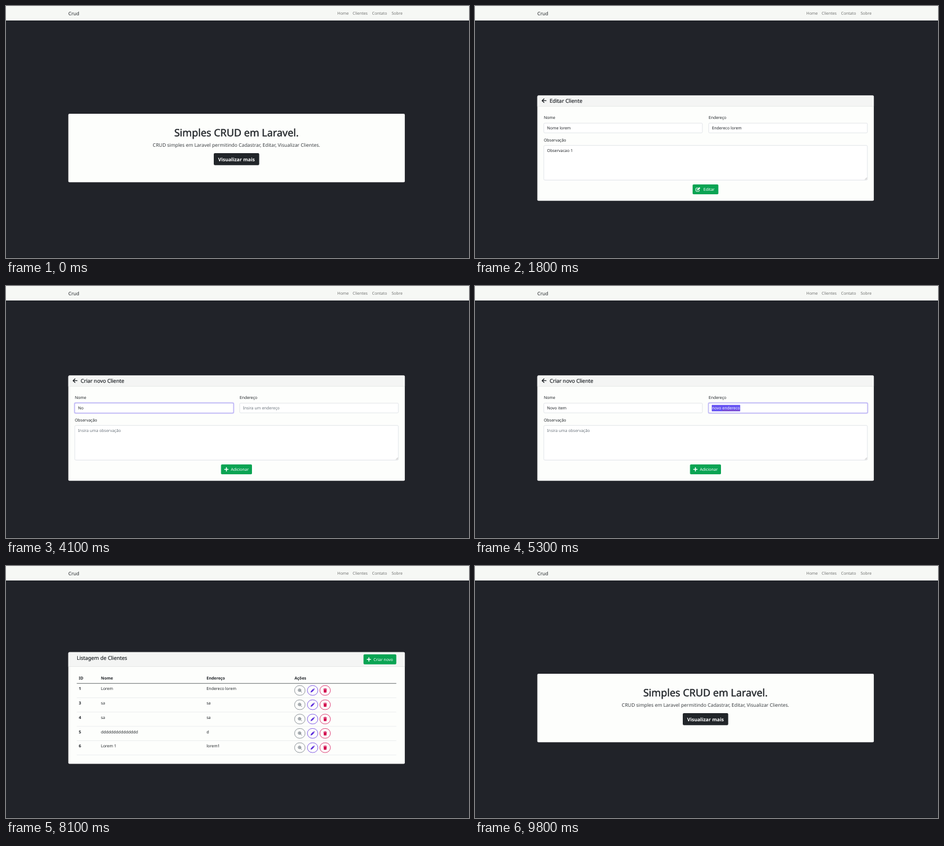
Recreate the animation shown at these times as an HTML page. Size 800 by 435 pixels, loop 9900 ms.

```html
<!DOCTYPE html>
<html lang="pt">
<head>
<meta charset="utf-8">
<title>Crud</title>
<style>
  html, body { margin: 0; width: 100%; height: 100%; overflow: hidden; background: #212329; }
  svg { display: block; width: 800px; height: 435px; }
  text { font-family: "Noto Sans", "Open Sans", sans-serif; text-rendering: geometricPrecision; white-space: pre; }
</style>
</head>
<body>
<svg id="stage" viewBox="0 0 800 435"></svg>
<script>
const LOOP = 9900;
const INK = '#212529', GREEN = '#0aa453', GREEN_HOVER = '#0b8c47';
const GRAY = '#6c757d', INDIGO = '#5a2bdc', RED = '#d2044c', SELECT = '#6552f2';
const SIZE = 6.95;
const stage = document.getElementById('stage');

// Width of a run of text, used for selection boxes.
const pen = document.createElement('canvas').getContext('2d');
function widthOf(str) {
  pen.font = '100px "Noto Sans", "Open Sans", sans-serif';
  return pen.measureText(str).width * SIZE / 100;
}

const rect = (x, y, w, h, fill, r = 0, more = '') =>
  `<rect x="${x}" y="${y}" width="${w}" height="${h}" rx="${r}" fill="${fill}" ${more}/>`;
const line = (x1, x2, y, color, w = .6) =>
  `<path d="M${x1} ${y}H${x2}" stroke="${color}" stroke-width="${w}"/>`;

// Text is placed by the middle of its capitals.
function text(str, x, mid, { size = SIZE, fill = INK, bold, medium, anchor = 'start' } = {}) {
  const extra = (bold ? ' font-weight="700"' : '') +
    (medium ? ` stroke="${fill}" stroke-width="${size * .022}"` : '');
  return `<text x="${x}" y="${mid + size * .357}" font-size="${size}" fill="${fill}" text-anchor="${anchor}"${extra}>${str}</text>`;
}

function selected(str, x, mid) {
  return rect(x - .3, mid - 5.5, widthOf(str) + .6, 11, SELECT) + text(str, x, mid, { fill: '#fff' });
}

// Icons are drawn around the origin.
const icons = {
  plus: c => `<path d="M-3 0H3M0-3V3" stroke="${c}" stroke-width="1.5" stroke-linecap="round"/>`,
  arrow: c => `<path d="M3.6 0H-3M0-3.2L-3.3 0L0 3.2" fill="none" stroke="${c}" stroke-width="1.4" stroke-linecap="round" stroke-linejoin="round"/>`,
  zoom: c => `<g fill="none" stroke="${c}" stroke-width=".9" stroke-linecap="round"><circle cx="-.5" cy="-.5" r="2.4"/><path d="M1.4 1.4L3.2 3.2M-1.7-.5H.7M-.5-1.7V.7"/></g>`,
  pencil: c => `<path d="M-3.5 3.5L-3 1.2L1-2.8L2.8-1L-1.2 3ZM1.6-3.2L2.2-3.6Q2.7-3.8 3.3-3.1T3.6-2.1L3.1-1.5Z" fill="${c}"/>`,
  trash: c => `<path d="M-3-3H-1.2L-.8-3.6H.8L1.2-3H3V-2.1H-3ZM-2.6-1.6H2.6L2.3 3.1Q2.2 3.6 1.7 3.6H-1.7Q-2.2 3.6-2.3 3.1Z" fill="${c}"/>`,
  edit: c => `<path d="M.4-2.3H-2.9Q-3.6-2.3-3.6-1.6V2.7Q-3.6 3.4-2.9 3.4H1.5Q2.2 3.4 2.2 2.7V.8" fill="none" stroke="${c}" stroke-width="1"/><path d="M-1.5 1.5L-1.2-.2L2.4-3.7L4-2.1L.3 1.3Z" fill="${c}"/>`
};
const icon = (name, x, y, color = '#fff') => `<g transform="translate(${x} ${y})">${icons[name](color)}</g>`;

function button(label, name, x, y, w, fill, textX) {
  return rect(x, y, w, 17.2, fill, 1.8) + icon(name, x + 9.3, y + 8.6) +
    text(label, textX, y + 8.6, { fill: '#fff' });
}

function card(top, height, head = 0) {
  let s = rect(107.7, top, 581.4, height, '#fdfefc', 2);
  if (head) {
    s += `<path d="M107.7 ${top + head}V${top + 2}q0-2 2-2H687.1q2 0 2 2V${top + head}Z" fill="#f4f5f4"/>`;
    s += line(107.7, 689.1, top + head, '#dcdedd');
  }
  return s;
}

function frame() {
  const nav = [['Home', 572.5], ['Clientes', 599], ['Contato', 632.5], ['Sobre', 666.3]];
  return rect(0, 0, 800, 435, '#212329') + rect(0, 434, 800, 1, '#1a1b20') +
    rect(0, 0, 800, 25, '#f6f8f5') + text('Crud', 107.7, 12.8, { size: 8.3 }) +
    nav.map(([label, x]) => text(label, x, 12.8, { fill: '#717372' })).join('');
}

function home() {
  const mid = 398.2;
  return card(186, 118.3) +
    text('Simples CRUD em Laravel.', mid, 218.6, { size: 17.5, medium: true, anchor: 'middle' }) +
    text('CRUD simples em Laravel permitindo Cadastrar, Editar, Visualizar Clientes.', mid, 239.7,
      { size: 8.4, fill: '#3b3f43', anchor: 'middle' }) +
    rect(359, 254, 78.5, 20.8, INK, 2) +
    text('Visualizar mais', mid, 264.6, { size: 8.45, fill: '#fff', bold: true, anchor: 'middle' });
}

function list(rows, { mark, hover } = {}) {
  const pitch = 24.7, height = 69.3 + rows.length * pitch;
  const top = 245.1 - height / 2;
  const cols = [['ID', 125.8], ['Nome', 164], ['Endereço', 346.5], ['Ações', 498.5]];
  const actions = [['zoom', 507.7, GRAY], ['pencil', 529.8, INDIGO], ['trash', 551.4, RED]];
  let s = card(top, height, 24.8) +
    text('Listagem de Clientes', 122.3, top + 10.6, { size: 8.95, medium: true }) +
    button('Criar novo', 'plus', 617.7, top + 3.9, 56.7, hover ? GREEN_HOVER : GREEN, 635) +
    cols.map(([label, x]) => text(label, x, top + 44.8, { bold: true })).join('') +
    line(122.3, 674.4, top + 54, '#45494d', .8);
  rows.forEach(([id, name, address], i) => {
    const y = top + 63.3 + i * pitch;
    s += text(id, 125.8, y, { bold: true });
    s += mark && i === 0 ? selected(name, 164, y) : text(name, 164, y);
    s += text(address, 346.5, y) + line(122.3, 674.4, y + 15.4, '#dfe2e4');
    for (const [name, x, color] of actions) {
      s += rect(x - 9.1, y - 5.6, 18.2, 16.8, 'none', 8.4, `stroke="${color}" stroke-width=".75"`);
      s += icon(name, x, y + 2.8, color);
    }
  });
  return s;
}

function field(label, x, y, w, h, { value, hint, focus, mark }) {
  const mid = y + 8.6, tx = x + 5.6;
  let s = text(label, x, y - 9.2);
  if (focus) s += rect(x - 1.4, y - 1.4, w + 2.8, h + 2.8, '#c9c3f7', 2.6);
  s += rect(x, y, w, h, '#fff', 1.8, `stroke="${focus ? '#a79cf0' : '#ced4da'}" stroke-width=".6"`);
  if (!value) return s + text(hint, tx, mid, { fill: GRAY });
  if (!mark) return s + text(value, tx, mid);
  const start = tx + widthOf('novo '), n = Math.floor((tx + widthOf(value) - start) / 2);
  return s + selected(value, tx, mid) +
    `<path d="M${start} ${mid + 4.3}${'l1-.8l1 .8'.repeat(n)}" fill="none" stroke="#d33a5c" stroke-width=".5"/>`;
}

function form(title, name, address, note, submit) {
  return card(154.4, 181.8, 18.8) + icon('arrow', 119.2, 163.4, INK) +
    text(title, 129, 163.7, { size: 9, medium: true }) +
    field('Nome', 118.9, 202.2, 274, 16.8, { hint: 'Insira um nome', ...name }) +
    field('Endereço', 403.8, 202.2, 274.2, 16.8, { hint: 'Insira um endereço', ...address }) +
    field('Observação', 118.9, 240.7, 559.1, 59.8, { hint: 'Insira uma observação', ...note }) +
    '<path d="M673.5 299.5L677-4M675.5 299.5L677 298" stroke="none"/>' +
    '<path d="M673.8 299.6L677.2 296.2M675.6 299.6L677.2 298" stroke="#777" stroke-width=".5"/>' +
    submit;
}

const typed = (str, t, start, end) =>
  str.slice(0, Math.max(0, Math.ceil((t - start) / (end - start) * str.length)));
const within = (t, a, b) => t >= a && t < b;

function clients(t) {
  const rows = [
    [1, t < 2900 ? 'Nome lorem' : 'Lorem', 'Endereco lorem'],
    [3, 'sa', 'sa'], [4, 'sa', 'sa'],
    [5, 'd'.repeat(15), 'd'], [6, 'Lorem 1', 'lorem1']
  ];
  if (within(t, 6600, 7800)) rows.push([7, 'Novo item', 'novo endereco']);
  return list(rows, { mark: within(t, 3200, 3650), hover: within(t, 3400, 3650) });
}

function editPage(t) {
  return form('Editar Cliente',
    { value: t < 2100 ? 'Nome lorem' : typed('Lorem', t, 2100, 2600), focus: within(t, 1950, 2750) },
    { value: 'Endereco lorem' }, { value: 'Observacao 1' },
    button('Editar', 'edit', 376, 307.9, 44.5, GREEN, 394.8));
}

function createPage(t) {
  return form('Criar novo Cliente',
    { value: typed('Novo item', t, 4000, 4600), focus: within(t, 3900, 4700) },
    { value: typed('novo endereco', t, 4700, 5150), focus: within(t, 4700, 5600), mark: within(t, 5200, 5600) },
    { value: typed('Observacao', t, 5700, 6300), focus: within(t, 5600, 6450) },
    button('Adicionar', 'plus', 371.5, 307.9, 53.5, GREEN, 388.5));
}

const scenes = [[700, home], [1700, clients], [2900, editPage], [3650, clients],
  [6600, createPage], [9300, clients], [LOOP, home]];

let shown = '';
function render(t) {
  const [, scene] = scenes.find(([end]) => t < end);
  const next = frame() + scene(t);
  if (next !== shown) stage.innerHTML = shown = next;
}

const began = performance.now();
function tick() {
  render((performance.now() - began) % LOOP);
  requestAnimationFrame(tick);
}
tick();
</script>
</body>
</html>
```
